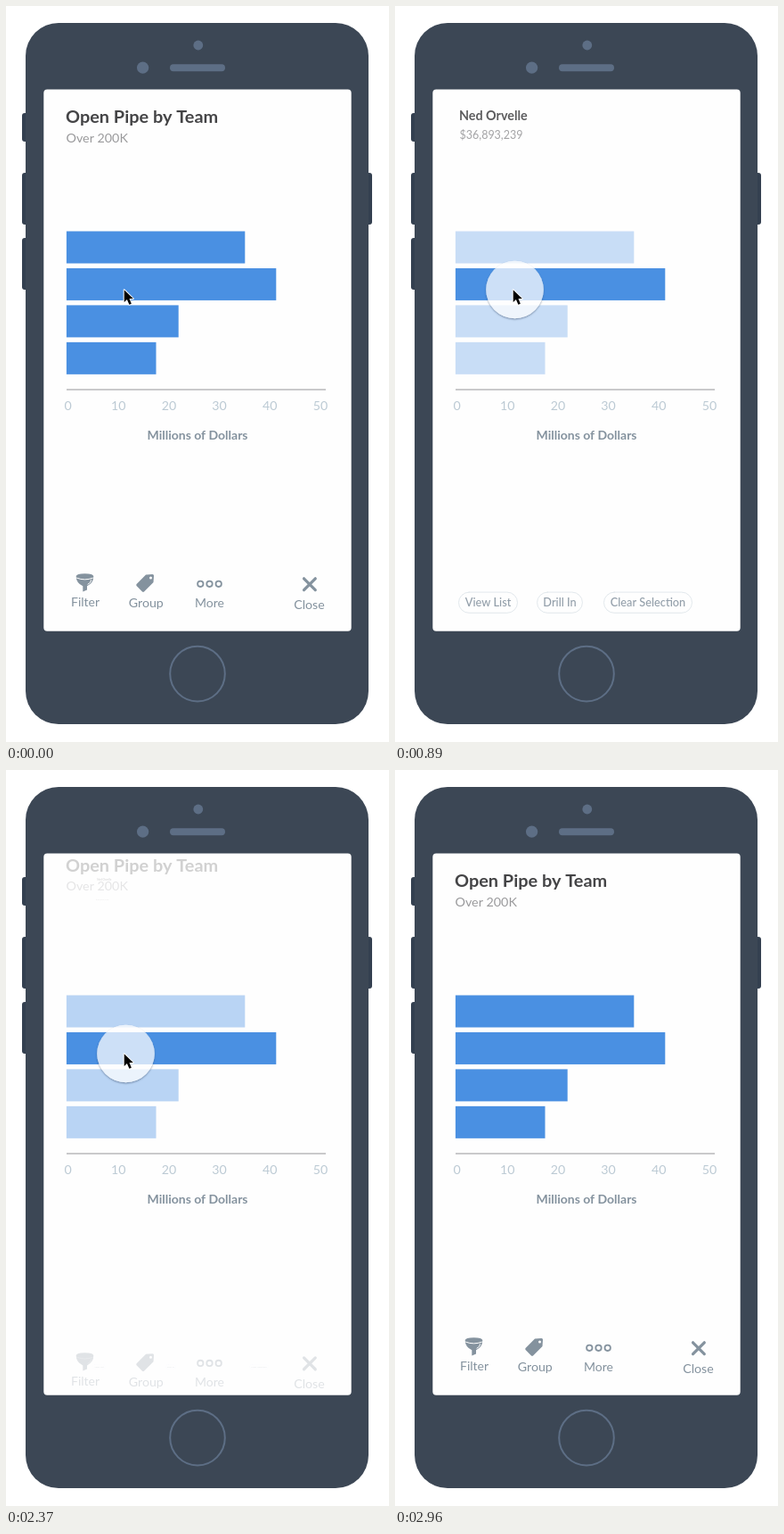
Recreate the animation shown at these times as an HTML page with a canvas. Size 430x825 px, loop 4.41 s.

```html
<!DOCTYPE html>
<html lang="en">
<head>
<meta charset="utf-8">
<title>Chart selection on a phone</title>
<style>
html, body { margin: 0; width: 100%; height: 100%; overflow: hidden; background: #fff; }
canvas { display: block; width: 430px; height: 825px; }
</style>
</head>
<body>
<canvas id="stage"></canvas>
<script>
const LOOP = 4410, TICK = 148, W = 430, H = 825;
const OPEN = 620, CLOSE = 2310, TAP = 3 * TICK;
const TAPS = [4 * TICK, 16 * TICK], CURSOR_END = 20 * TICK;
const BLUE = '#4a90e2', SLATE = '#3c4755', TRIM = '#5d6e85', GREY = '#84929e', PAPER = '#fefefe';
const canvas = document.getElementById('stage');
const ctx = canvas.getContext('2d');
const dpr = window.devicePixelRatio || 1;
canvas.width = W * dpr;
canvas.height = H * dpr;

const ramp = (t, start, length) => Math.min(1, Math.max(0, (t - start) / length));
const smooth = x => x * x * (3 - 2 * x);
const easeOut = x => 1 - (1 - x) ** 3;

// Rises after OPEN, falls after CLOSE
const pulse = (t, length) =>
  smooth(ramp(t, OPEN, length)) - smooth(ramp(t, CLOSE, length));

// Motion is sampled on a slow, steady tick
function poseAt(time) {
  const t = Math.floor((time + 7) / TICK) * TICK;
  return {
    away: pulse(t, 180),
    bars: 1 - 0.7 * pulse(t, 270),
    popup: easeOut(ramp(t, OPEN + 90, 340)) - smooth(ramp(t, CLOSE, 80)),
    touch: TAPS.some(s => t >= s && t < s + TAP),
    cursor: t < CURSOR_END
  };
}

function text(str, x, y, size, color, weight = 400, align = 'center') {
  ctx.font = `${weight} ${size}px Lato, "Open Sans", sans-serif`;
  ctx.textAlign = align;
  ctx.fillStyle = color;
  ctx.fillText(str, x, y);
}

function box(x, y, w, h, r, color) {
  ctx.beginPath();
  ctx.roundRect(x, y, w, h, r);
  ctx.fillStyle = color;
  ctx.fill();
}

function disc(x, y, r, color) {
  ctx.beginPath();
  ctx.arc(x, y, r, 0, Math.PI * 2);
  ctx.fillStyle = color;
  ctx.fill();
}

function ring(x, y, r, width, color) {
  ctx.beginPath();
  ctx.arc(x, y, r, 0, Math.PI * 2);
  ctx.lineWidth = width;
  ctx.strokeStyle = color;
  ctx.stroke();
}

function shape(path, color) {
  ctx.fillStyle = color;
  ctx.fill(new Path2D(path), 'evenodd');
}

function line(path, width, color) {
  ctx.lineWidth = width;
  ctx.lineCap = ctx.lineJoin = 'round';
  ctx.strokeStyle = color;
  ctx.stroke(new Path2D(path));
}

function layer(alpha, dx, dy, scale, draw) {
  if (alpha <= 0) return;
  ctx.save();
  ctx.globalAlpha = alpha;
  ctx.translate(dx, dy);
  ctx.scale(scale, scale);
  draw();
  ctx.restore();
}

function phone() {
  for (const [x, y, h] of [[18, 120, 32], [18, 187, 58], [18, 260, 58], [401, 187, 58]])
    box(x, y, 10, h, 3, '#344050');
  box(22, 19, 385, 786, 37, SLATE);
  disc(215.8, 44, 5.4, TRIM);
  disc(153.6, 69.2, 6.6, TRIM);
  box(184, 65.2, 62, 8, 4, TRIM);
  ring(215, 748.6, 30.8, 2, TRIM);
  box(42.3, 93.5, 345.4, 607.3, 4, PAPER);
}

function chart(others) {
  [200.4, 235.4, 125.8, 100.6].forEach((w, i) => {
    ctx.globalAlpha = i === 1 ? 1 : others;
    ctx.fillStyle = BLUE;
    ctx.fillRect(67.9, 252.5 + i * 41.45, w, 36);
  });
  ctx.globalAlpha = 1;
  ctx.fillStyle = '#c9c9cb';
  ctx.fillRect(68, 429, 291, 2);
  for (let i = 0; i <= 5; i++)
    text(String(i * 10), 69.5 + i * 56.7, 453, 14.2, '#bccad4');
  text('Millions of Dollars', 215, 485.5, 14, GREY, 700);
}

function header() {
  text('Open Pipe by Team', 67, 131, 19.9, '#444446', 700, 'left');
  text('Over 200K', 67.5, 152.5, 14.3, '#9a9a9c', 400, 'left');
}

function toolbar() {
  // Funnel
  shape('M78.7 639.2Q79 636.2 88.5 636.2T98.3 639.2Q98.3 646.5 91 650.3V654.4' +
        'L86.3 656.4V650.3Q78.7 646.5 78.7 639.2Z', GREY);
  line('M79.6 641.2Q88.5 644.6 97.4 641.2M92 648.2Q95.6 646.8 95.6 643.6', 1, PAPER);
  // Tag
  shape('M157 637.5L164.5 637Q166 637 166 638.5L165.5 646L155 656.5Q154 657.3 153 656.5' +
        'L146.6 650Q145.8 649 146.6 648ZM161 641a1.5 1.5 0 1 0 3 0a1.5 1.5 0 1 0 -3 0Z', GREY);
  for (let i = 0; i < 3; i++) ring(218.3 + i * 10.2, 647.8, 3.2, 1.8, GREY);
  // Cross
  line('M334.5 641.8L347.3 654.6M347.3 641.8L334.5 654.6', 3.2, GREY);
  text('Filter', 89, 673, 14, GREY);
  text('Group', 157.3, 674, 14.2, GREY);
  text('More', 228.5, 674, 14, GREY);
  text('Close', 340.5, 676, 14.2, GREY);
}

// Each popup item fades and grows around its own centre
function popups(k) {
  layer(k, 110.3, 123.3, k, () =>
    text('Ned Orvelle', 0, 5.4, 16.1, '#48484a', 700));
  layer(k, 108, 144.8, k, () =>
    text('$36,893,239', 0, 5, 14, '#98989a'));
  const buttons = [['View List', 104.5, 74], ['Drill In', 185, 57], ['Clear Selection', 284, 111]];
  for (const [label, x, w] of buttons) {
    layer(k, x, 668.7, k, () => {
      ctx.beginPath();
      ctx.roundRect(-w / 2, -13, w, 26, 13);
      ctx.lineWidth = 1;
      ctx.strokeStyle = '#dbe2e8';
      ctx.stroke();
      text(label, 0, 5, 14.3, GREY, 500);
    });
  }
}

function touch() {
  const x = 134.5, y = 318, r = 32.3;
  // Thin shadow crescent below the disc
  ctx.save();
  ctx.beginPath();
  ctx.rect(90, 270, 90, 100);
  ctx.arc(x, y, r, 0, Math.PI * 2);
  ctx.clip('evenodd');
  ctx.shadowColor = 'rgba(40,60,90,.45)';
  ctx.shadowBlur = 2 * dpr;
  ctx.shadowOffsetY = 1.2 * dpr;
  disc(x, y, r, '#fff');
  ctx.restore();
  disc(x, y, r, 'rgba(255,255,255,.72)');
}

function cursor() {
  const arrow = 'M132.7 318.2V332L135.9 329.1L138.4 334.7L140.8 333.7L138.5 328.1H142.8Z';
  line(arrow, 2, '#fff');
  shape(arrow, '#000');
}

function draw(time) {
  const p = poseAt(time);
  const shift = 22.7 * p.away;
  ctx.setTransform(dpr, 0, 0, dpr, 0, 0);
  ctx.fillStyle = '#fff';
  ctx.fillRect(0, 0, W, H);
  phone();
  chart(p.bars);
  layer(1 - p.away, 0, -shift, 1, header);
  layer(1 - p.away, 0, shift, 1, toolbar);
  popups(p.popup);
  if (p.touch) touch();
  if (p.cursor) cursor();
}

const start = performance.now();
function tick() {
  draw((performance.now() - start) % LOOP);
  requestAnimationFrame(tick);
}
tick();
</script>
</body>
</html>
```
